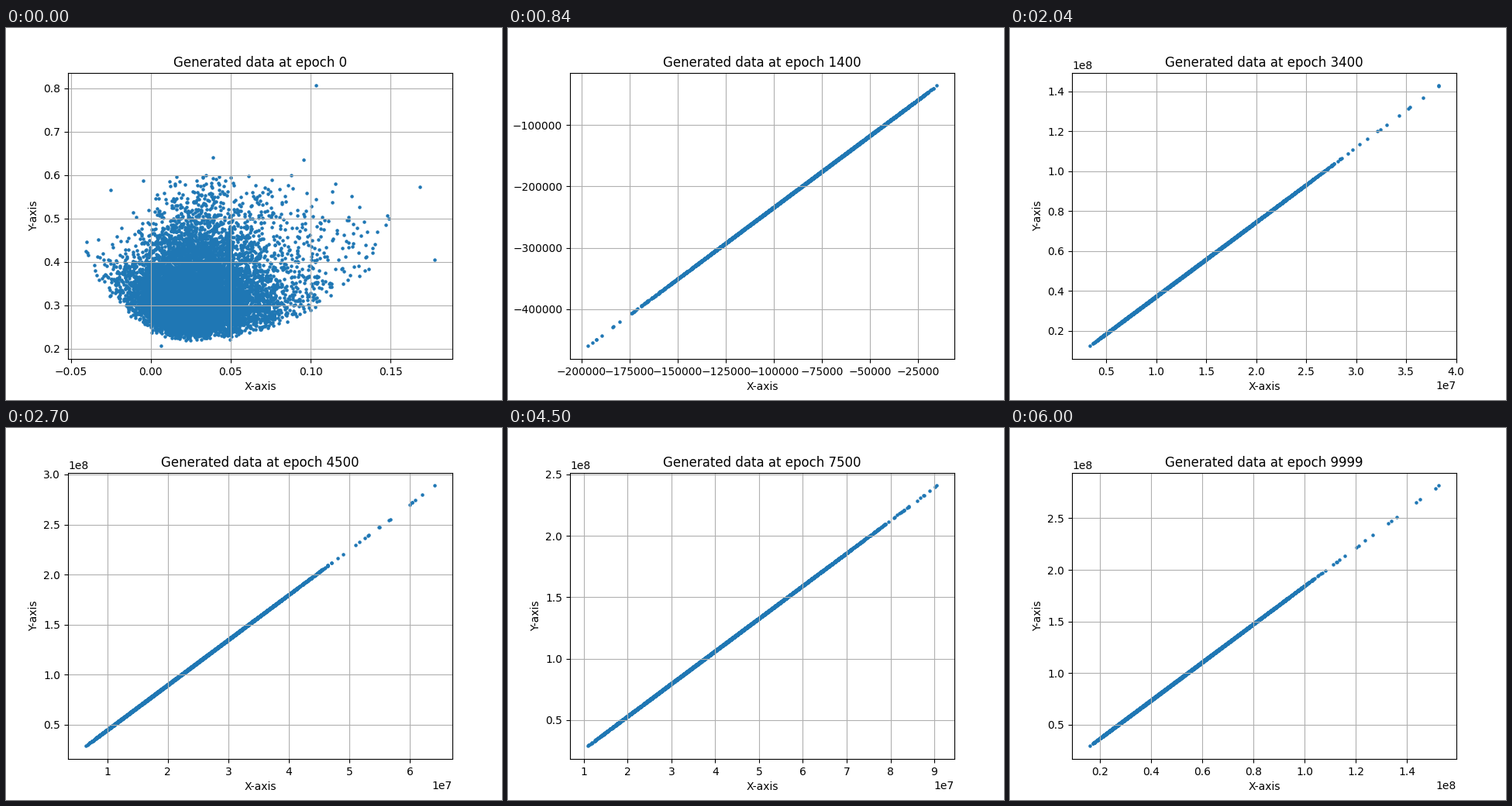
Recreate the animation shown at these times as a matplotlib script. Size 640x480 px, loop 6.06 s.

```python
import numpy as np
import matplotlib.pyplot as plt
from matplotlib.animation import FuncAnimation

FRAMES = 101
N_POINTS = 6000

# key states of the line: step, far end x and y, far/near ratio, solid share
KEYS = np.array([
    (1, -15, -36, 12.5, .75),
    (14, -196990, -460300, 12.9, .84),
    (23, -2.6136e7, 2.091e7, 11.93, .69),
    (25, 1.2e7, 4.2e7, 10, .7),
    (38, 5.2e7, 2.0e8, 10, .7),
    (45, 6.415e7, 2.8885e8, 10.06, .695),
    (59, 8.41e7, 2.942e8, 9.965, .69),
    (75, 9.06e7, 2.409e8, 8.355, .865),
    (100, 1.5256e8, 2.816e8, 9.617, .655)])
STEP, FAR_X, FAR_Y, RATIO, SOLID = KEYS.T
LOG_NEAR = np.log(np.hypot(FAR_X, FAR_Y) / RATIO)
ANGLE = np.unwrap(np.arctan2(FAR_Y, FAR_X))

# outermost points of the first cloud, in stage pixels
EDGE = [(400, 74.4), (553.4, 299), (534, 205), (384, 170),
        (267, 167), (135, 209), (102.6, 288), (200, 410.4)]


def cloud():
    rng = np.random.default_rng(4)
    core = rng.normal(236, 37, 9000)
    wing = 286 + rng.exponential(38, 1850)
    px = np.concatenate([core[core < 291], wing])
    floor = 407 - np.where(px < 240, .005, .0018) * (px - 240) ** 2
    shape = np.interp(px, [280, 340], [3.1, 1.5])
    scale = np.interp(px, [130, 220, 290, 350], [10, 21, 24, 42])
    py = floor - rng.gamma(shape, scale)
    keep = (py > 188) & (px > 104) & (px < 536)
    px, py = np.concatenate([np.c_[px, py][keep], EDGE]).T
    return (px - 186.8) / 2062, .8 - (py - 77.9) / 560


def line(i):
    rng = np.random.default_rng(100 + i)
    near = np.exp(np.interp(i, STEP, LOG_NEAR))
    angle = np.interp(i, STEP, ANGLE)
    solid = np.interp(i, STEP, SOLID)
    # the farthest sample jumps about between the key states
    jitter = min(1, abs(STEP - i).min() / 2)
    ratio = np.interp(i, STEP, RATIO) + jitter * rng.uniform(0, 1.6)

    body = rng.beta(2.5, 4.5, N_POINTS) * solid / .82
    tail = solid + (1 - solid) * rng.random(18) ** 2
    u = np.concatenate([[0, 1], body[body < solid], tail])
    r = near * (1 + (ratio - 1) * u)
    return r * np.cos(angle), r * np.sin(angle)


def limits(v):
    pad = .05 * np.ptp(v)
    return v.min() - pad, v.max() + pad


fig, ax = plt.subplots(figsize=(6.4, 4.8), dpi=100)
dots = ax.scatter([], [], s=5, color="C0")
title = ax.set_title("", pad=5.3)
ax.set_xlabel("X-axis")
ax.set_ylabel("Y-axis")
ax.grid(True)


def update(i):
    x, y = line(i) if i else cloud()
    dots.set_offsets(np.c_[x, y])
    ax.set_xlim(limits(x))
    ax.set_ylim(limits(y))
    title.set_text(f"Generated data at epoch {min(i * 100, 9999)}")
    return dots, title


anim = FuncAnimation(fig, update, frames=FRAMES, interval=60, repeat=True,
                     repeat_delay=0, blit=False)
plt.show()
```
